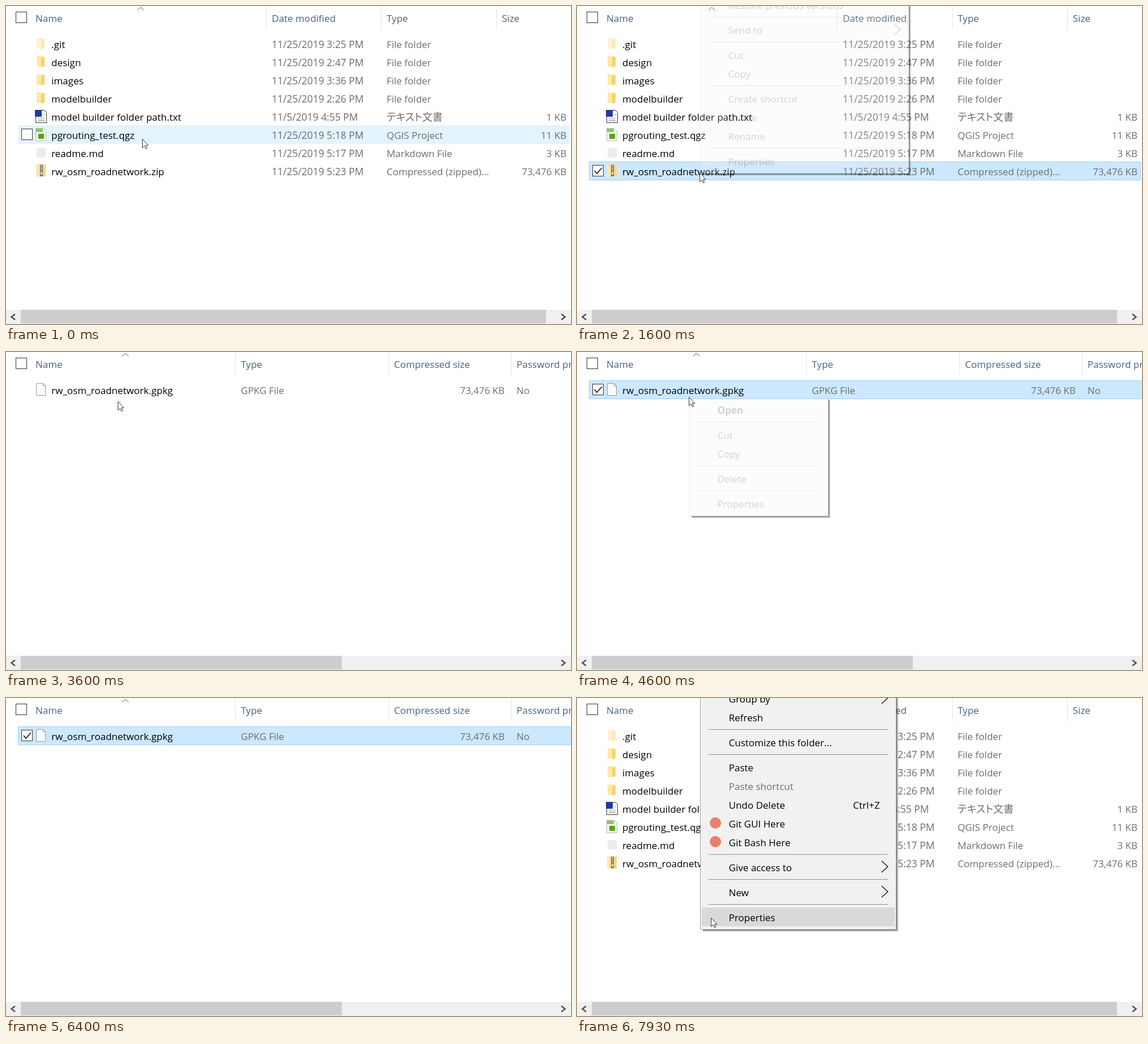
An HTML page that plays this animation: 996x560 px, repeating every 8000 ms.

```html
<!DOCTYPE html>
<html lang="en">
<head>
<meta charset="utf-8">
<title>File manager</title>
<style>
html, body { margin: 0; width: 100%; height: 100%; overflow: hidden; background: #fff; }
svg { display: block; width: 996px; height: 560px; }
text { font: 17px "Open Sans", "Noto Sans", sans-serif; white-space: pre; }
.date { font-size: 17.4px; }
.grey { fill: #6d6d6d; }
.jp { font: 18px "Noto Sans CJK JP", "Noto Sans CJK", sans-serif; font-weight: 300; font-feature-settings: "palt"; }
.head { fill: #4c607a; }
.bold { font-weight: 700; }
.end { text-anchor: end; }
.line { fill: none; stroke: #444; }
.box { fill: #fff; stroke: #333; }
.bg { fill: none; }
.row .box, .row .tick { display: none; }
.hover .bg { fill: #e5f3ff; stroke: #e5f3ff; }
.sel .bg { fill: #cce8ff; stroke: #99d1ff; }
.hover .box, .sel .box, .sel .tick { display: inline; }
</style>
</head>
<body>
<svg id="stage" viewBox="0 0 996 560"></svg>
<script>
const stage = document.getElementById('stage');
const text = (x, y, s, cls = '') => `<text x="${x}" y="${y}" class="${cls}">${s}</text>`;
const rect = (x, y, w, h, fill, more = '') =>
  `<rect x="${x}" y="${y}" width="${w}" height="${h}" fill="${fill}" ${more}/>`;
const path = (d, fill, stroke = 'none', width = 1, more = '') =>
  `<path d="${d}" fill="${fill}" stroke="${stroke}" stroke-width="${width}" ${more}/>`;
const checkbox = (x, y) => rect(x + .5, y + .5, 19, 19, '#fff', 'class="box"');

// Icons are placed relative to the top of their row
const folder = rect(54, 6, 11, 19, '#ffe9a6') + path('M62 9l6-2v17l-6 2z', '#f6d26c');
const page = path('M53.5 5.5h12l4 4v17h-16z', '#fafafa', '#9a9a9a') + path('M65.5 5.5v4h4', 'none', '#9a9a9a');
const icons = {
  folder,
  hidden: `<g opacity=".5">${folder}</g>`,
  page,
  txt: path('M52.5 5.5h15l4 4v18h-19z', '#fff', '#333') +
    path('M56 19.5h12M56 22.5h12M56 24.5h12M66 13.5h3', 'none', '#999') + rect(51, 5, 12, 12, '#1c3c9c'),
  project: path('M52.5 5.5h14l4 4v18h-18z', '#f4f9ef', '#b4c0ac') + rect(53, 6, 12, 6, '#8cc66a') +
    rect(57, 15, 10, 9, '#58a618'),
  md: rect(54, 8, 16, 17, '#ececec', 'rx="2"'),
  zip: rect(53, 5, 17, 21, '#f9d978') + path('M53 5l6 2v20l-6-1z', '#ffe9a8') + rect(60, 5, 5, 21, '#77787c') +
    path('M62.5 5v12', 'none', '#e8e8e8', 2, 'stroke-dasharray="1.5"') + rect(61, 18, 3, 5, '#d8d8d8')
};

function row(i, icon, name, cells, width) {
  return `<g class="row" transform="translate(0 ${50 + 32 * i})">` +
    `<rect class="bg" x="21.5" y=".5" width="${width}" height="32"/>` + checkbox(27, 6) +
    `<path class="tick" d="M31 16l4 5 9-10" fill="none" stroke="#222" stroke-width="1.8"/>` +
    icons[icon] + text(80, 24, name) + cells + '</g>';
}

function view(id, arrow, columns, thumb, rows) {
  const heads = columns.map(([x, s]) =>
    text(x, 28, s, 'head') + rect(Math.floor(x) - 10, 0, 1, 41, '#e3e3e3')).join('');
  return `<g id="${id}">` + checkbox(17, 10) + text(52, 28, 'Name', 'head') + heads +
    `<path class="line" d="M${arrow - 5.5} 7.5l5.5-5.5 5.5 5.5"/>` +
    rect(0, 535, 996, 25, '#f0f0f0') + rect(26, 535, thumb, 24, '#cdcdcd') +
    path('M16 542.5l-6.5 5 6.5 5M979 542.5l6.5 5-6.5 5', 'none', '#505050', 2.4) + rows + '</g>';
}

const files = [
  ['hidden', '.git', '11/25/2019 3:25 PM', 'File folder', ''],
  ['folder', 'design', '11/25/2019 2:47 PM', 'File folder', ''],
  ['folder', 'images', '11/25/2019 3:36 PM', 'File folder', ''],
  ['folder', 'modelbuilder', '11/25/2019 2:26 PM', 'File folder', ''],
  ['txt', 'model builder folder path.txt', '11/5/2019 4:55 PM', 'テキスト文書', '1 KB'],
  ['project', 'pgrouting_test.qgz', '11/25/2019 5:18 PM', 'QGIS Project', '11 KB'],
  ['md', 'readme.md', '11/25/2019 5:17 PM', 'Markdown File', '3 KB'],
  ['zip', 'rw_osm_roadnetwork.zip', '11/25/2019 5:23 PM', 'Compressed (zipped)...', '73,476 KB']
].map(([icon, name, date, type, size], i) => row(i, icon, name,
  text(468.5, 24, date, 'grey date') + text(671, 24, type, 'grey' + (icon == 'txt' ? ' jp' : '')) +
  text(988, 24, size, 'grey end'), 972)).join('');

const packed = row(0, 'page', 'rw_osm_roadnetwork.gpkg',
  text(414, 24, 'GPKG File', 'grey') + text(879, 24, '73,476 KB', 'grey end') + text(900, 24, 'No', 'grey'), 990);

// '-' is a separator, '>' a submenu, '*' bold, '~' disabled, '#' an icon, '|' a shortcut
const menus = [
  { x: 216, right: 585, top: -30, first: -1, from: 24, to: 35, rate: .28,
    items: 'Restore previous versions,-,>Send to,-,Cut,Copy,-,Create shortcut,Delete,Rename,-,Properties' },
  { x: 197, right: 443, top: 79, first: 103, from: 69, to: 87, rate: .28,
    items: '*Open,-,Cut,Copy,-,Delete,-,Properties' },
  { x: 217, right: 563, top: -30, first: 2, from: 117, to: 120, rate: .42,
    items: '>Group by,Refresh,-,Customize this folder...,-,Paste,~Paste shortcut,Undo Delete|Ctrl+Z,' +
      '#Git GUI Here,#Git Bash Here,-,>Give access to,-,>New,-,Properties' }
];

function menu(m) {
  const { x, right, top } = m;
  let y = m.first, parts = '';
  m.ys = [];
  for (const item of m.items.split(',')) {
    if (item == '-') {
      parts += rect(x + 15, y - 13, right - x - 30, 1, '#919191');
      y += 11;
      continue;
    }
    const mark = '>*~#'.includes(item[0]) ? item[0] : '';
    const [label, keys] = item.slice(mark.length).split('|');
    parts += text(x + 50.5, y + 6, label, { '*': 'bold', '~': 'grey' }[mark] || '');
    if (keys) parts += text(right - 29, y + 6, keys, 'end');
    if (mark == '>') parts += path(`M${right - 26} ${y - 12}l11 10-11 10`, 'none', '#2a0c08', 1.4);
    if (mark == '#') parts += `<circle cx="${x + 27}" cy="${y - 2}" r="10" fill="#e8826a"/>`;
    m.ys.push(y);
    y += 33;
  }
  const bottom = y - 12;
  const shadow = [.5, .36, .2, .07].map((a, i) =>
    path(`M${x + 5} ${bottom + i + .5}H${right + i + .5}V${top + 5}`, 'none', `rgba(0,0,0,${a})`)).join('');
  return `<g class="menu">${shadow}<g>` +
    rect(x + .5, top + .5, right - x - 1, bottom - top - 1, '#f1f1f1', 'stroke="#a0a0a0"') +
    rect(x + 3, 0, right - x - 6, 33, '#d9d9d9', 'class="mark"') + parts + '</g></g>';
}

stage.innerHTML =
  view('list', 237.5, [[468.5, 'Date modified'], [671, 'Type'], [874, 'Size']], 926, files) +
  view('archive', 210.5, [[414, 'Type'], [684, 'Compressed size'], [900, 'Password protected']], 566, packed) +
  menus.map(menu).join('') +
  `<g id="cursor">${path('M.5 .5V15.5L4 12.3L6.5 17.5L8.7 16.5L6.4 11.3H10.8Z', '#fff', '#333')}</g>`;

const list = document.getElementById('list');
const archive = document.getElementById('archive');
const cursor = document.getElementById('cursor');
const listRows = [...list.querySelectorAll('.row')];
const archiveRow = archive.querySelector('.row');
document.querySelectorAll('.menu').forEach((g, i) => {
  menus[i].g = g;
  menus[i].panel = g.lastChild;
  menus[i].mark = g.querySelector('.mark');
});
const show = (el, on) => el.style.display = on ? 'inline' : 'none';

// Pointer path: tick, x, y (15 ticks per second)
const stops = [
  [0, 240, 234], [3, 214, 294], [5, 198, 276], [11, 198, 276], [13, 216, 294], [46, 216, 294],
  [50, 208, 150], [54, 197, 87], [56, 197, 79], [73, 197, 79], [78, 237, 135], [81, 238, 152],
  [83, 240, 176], [87, 240, 176], [95, 6, 4], [96, -20, -30], [102, 40, -30], [107, 164, 261],
  [111, 216, 408], [118, 216, 408], [119, 236, 387], [120, 236, 387]
];
function pointer(n) {
  const i = stops.findIndex(s => s[0] > n);
  const [a, x, y] = stops[i - 1], [b, u, v] = stops[i];
  const k = (n - a) / (b - a);
  return [Math.round(x + (u - x) * k), Math.round(y + (v - y) * k)];
}

function draw(n) {
  const [x, y] = pointer(n);
  cursor.setAttribute('transform', `translate(${x} ${y})`);
  show(list, n < 41 || n >= 103);
  show(archive, n >= 43 && n < 101);
  show(archiveRow, n >= 44);

  const over = Math.floor((y - 50) / 32);
  const state = (i, selected) => 'row ' + (selected ? 'sel' : i == over ? 'hover' : '');
  listRows.forEach((r, i) => r.setAttribute('class', state(i, i == 7 && n >= 8 && n < 114)));
  archiveRow.setAttribute('class', state(0, n >= 57));

  for (const m of menus) {
    show(m.g, n >= m.from && n < m.to);
    m.panel.setAttribute('opacity', Math.min(1, .17 + (n - m.from) * m.rate));
    const hit = x > m.x + 3 && m.ys.find(c => y >= c - 18 && y < c + 15);
    show(m.mark, hit);
    if (hit) m.mark.setAttribute('y', hit - 18);
  }
}

const start = performance.now();
function frame() {
  const t = (performance.now() - start) % 8000;
  draw(Math.min(119, Math.floor((t + 4) * .015)));
  requestAnimationFrame(frame);
}
frame();
</script>
</body>
</html>
```
